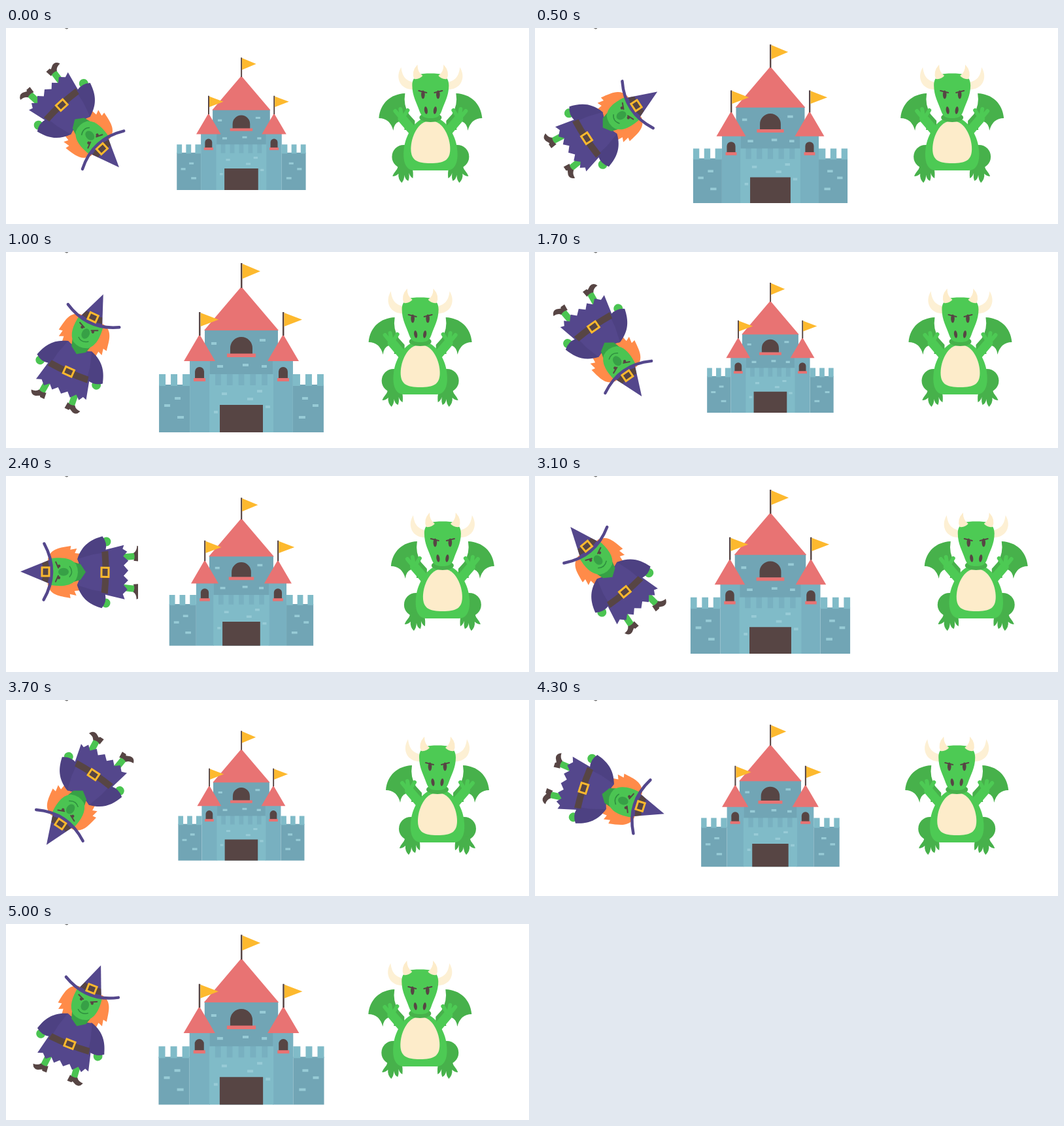
Animation of 800 by 300 pixels, one loop 5.1 s. Source, as an HTML page without scripts:

```html
<!DOCTYPE html>
<html lang="en">
<head>
<meta charset="utf-8">
<title>Witch, castle and dragon</title>
<style>
  @property --phase { syntax: "<number>"; inherits: true; initial-value: 0; }

  html, body { margin: 0; width: 100%; height: 100%; overflow: hidden; background: #fff; }

  /* --swing bounces between 0 and 2, --shrink between 0 and 1 */
  svg {
    display: block; width: 800px; height: 300px;
    --abs: max(var(--phase), -1 * var(--phase));
    --swing: max(min(var(--abs), 4 - var(--abs)), var(--abs) - 4);
    --shrink: min(var(--swing), 2 - var(--swing));
    animation: run 5.1s infinite;
  }
  @keyframes run {
    0%     { --phase: -.763; animation-timing-function: steps(10); }
    19.6%  { --phase: .134;  animation-timing-function: steps(7); }
    33.33% { --phase: .807;  animation-timing-function: steps(7); }
    47.05% { --phase: 1.503; animation-timing-function: steps(7); }
    60.78% { --phase: 2.222; animation-timing-function: steps(12); }
    84.31% { --phase: 3.402; animation-timing-function: steps(7); }
    98.03% { --phase: 4.12;  animation-timing-function: steps(1); }
    100%   { --phase: 4.22; }
  }
  #witch  { transform: translate(112px, 147px) rotate(calc(var(--swing) * 180deg)); }
  #castle { transform: translate(359.7px, 146.6px) scale(calc(1.0454 - .344 * var(--shrink))); }
  #dragon { transform: translateX(calc(630.3px + 25px * var(--swing))); }

  .purple { fill: #54478c; } .sleeve { fill: #4d4182; } .hair { fill: #ff8b49; }
  .skin { fill: #4bc452; } .shade { fill: #37a046; }
  .dark { fill: #574544; } .gold { fill: #fdb92e; }
  .red { fill: #e87373; } .keep { fill: #71a5b5; } .tower { fill: #78b0c0; }
  .front { fill: #80bbc8; } .brick { fill: #97cbd6; }
  .leaf { fill: #4dca54; } .wing { fill: #47b14b; } .cream { fill: #fdecca; } .horn { fill: #fdf0d4; }
  .line { fill: none; stroke: #574544; stroke-width: 2; stroke-linecap: round; }
  .limb { fill: none; stroke: #4dca54; stroke-linecap: round; stroke-linejoin: round; }
  .buckle { fill: #574544; stroke: #fdb92e; stroke-width: 3; }
</style>
</head>
<body>
<svg viewBox="0 0 800 300">
  <clipPath id="stage"><path d="M0 0H202V300H0z"/></clipPath>
  <path d="M90 0h2v1h2v-1h1" fill="none" stroke="#555"/>

  <g clip-path="url(#stage)"><g id="witch">
    <g id="leg">
      <path class="skin" d="M18 64H28L30 85H20z"/>
      <path class="dark" d="M18 83Q24 86 30 83Q33 88 41 88Q38 96 31 94L25 91L24 93H17z"/>
      <circle class="skin" cx="47" cy="41" r="7"/>
    </g>
    <use href="#leg" transform="scale(-1 1)"/>
    <path class="hair" d="M-20-48C-36-44-37-30-40-13L-34-14L-36-4L-29-7L-28 2L-20 0H20L28 2L29-7L36-4L34-14L40-13C37-30 36-44 20-48z"/>
    <path class="purple" d="M-32 30H32L42 68L36 66L32 73L25 67L18 75L11 68L3 75L-5 68L-12 75L-19 68L-26 74L-33 67L-41 70z"/>
    <path class="sleeve" d="M-20-3Q0 6 20-3C42 4 50 18 55 35Q45 43 33 40H-33Q-45 43-55 35C-50 18-42 4-20-3z"/>
    <path class="purple" d="M-20-3Q0 6 20-3L27 20L30 38H-30L-27 20z"/>
    <path class="dark" d="M-31 34Q0 37 31 34L33 44Q0 47-33 44z"/>
    <rect class="buckle" x="-7" y="34" width="14" height="11"/>
    <path class="shade" d="M-15-8H15L12 2L0 10L-12 2z"/>
    <path class="skin" d="M-20-46H20C23-28 22-13 12-5Q0 1-12-5C-22-13-23-28-20-46z"/>
    <ellipse class="shade" cx="0" cy="-24" rx="6" ry="8"/>
    <path class="line" d="M-15-36L-6-32M15-36L6-32"/>
    <circle class="dark" cx="-9" cy="-31" r="2.2"/>
    <circle class="dark" cx="9" cy="-31" r="2.2"/>
    <path d="M-8-15Q0-8 9-15" fill="none" stroke="#2f8f40" stroke-width="1.5"/>
    <path class="purple" d="M0-90L18-46Q0-38-18-46z"/>
    <path class="dark" d="M-13-57Q0-53 13-57L17-48Q0-43-17-48z"/>
    <path d="M-43-54Q0-30 43-54" fill="none" stroke="#54478c" stroke-width="4.500" stroke-linecap="round"/>
    <rect class="buckle" x="-6.500" y="-57" width="13" height="11"/>
  </g></g>

  <g id="castle"><g transform="translate(-359.7 -146.6)">
    <path class="keep" d="M304 119H416V190H304z"/>
    <path class="tower" d="M304 187H416V210H304z"/>
    <g id="side">
      <path class="keep" d="M234 203H281V276H234z"/>
      <path class="front" d="M234 187h10v18h-10zM252 187h10v18h-10zM270 187h11v18h-11z"/>
      <path class="tower" d="M281 166H312V276H281z"/>
      <path class="red" d="M296 126L272 167H320z"/>
      <path class="dark" d="M289 194V183a7 7 0 0 1 14 0v11z"/>
      <path class="red" d="M287 193h18v5h-18z"/>
      <path class="brick" d="M242 233h9v4h-9zM258 222h9v4h-9zM262 251h10v4h-10z"/>
    </g>
    <use href="#side" transform="translate(720) scale(-1 1)"/>
    <path class="front" d="M311 276V187h9v17h8.800v-17h9v17h8.800v-17h9v17h8.800v-17h9v17h8.800v-17h9v17h8.800v-17h9v89z"/>
    <path class="brick" d="M314 138h8v4h-8zM388 133h9v4h-9zM323 173h9v4h-9zM362 171h9v4h-9zM391 173h8v4h-8zM330 215h8v4h-8zM369 223h9v4h-9zM384 211h8v4h-8zM318 243h6v4h-6zM397 235h7v4h-7z"/>
    <path class="red" d="M360 53L303 120H417z"/>
    <path class="dark" d="M343 156V147a17 17 0 0 1 34 0v9zM327 234H393V276H327z"/>
    <path class="red" d="M338 155.500h44v5.500h-44z"/>
    <path class="dark" d="M359 17h2.500v38h-2.500zM295 92h2.500v36h-2.500zM423 92h2.500v36h-2.500z"/>
    <path class="gold" d="M361.500 18L389 29.500L361.500 41zM297.500 93L325 103.500L297.500 114zM425.500 93L453 103.500L425.500 114z"/>
  </g></g>

  <g id="dragon">
    <g id="half">
      <path class="wing" d="M-79 138C-77 115-61 101-39 100Q-42 118-33 132L-24 142V156H-40Q-38 142-48 143Q-56 146-57 157Q-62 138-79 138z"/>
      <path class="limb" stroke-width="14" d="M-25 160L-43 139"/>
      <path class="limb" stroke-width="6" d="M-45 138L-54 127M-44 137L-46 124M-42 137L-35 126"/>
      <path class="horn" d="M-27 94C-43 95-56 79-45 60C-43 75-38 80-27 83z"/>
      <ellipse class="wing" cx="-41" cy="197" rx="18" ry="18"/>
      <path class="wing" d="M-53 207C-45 214-56 219-58 227Q-53 227-49 223Q-50 231-44 237Q-40 232-40 225Q-39 232-34 234Q-32 229-33 222Q-31 228-27 230Q-26 222-28 212z"/>
    </g>
    <use href="#half" transform="scale(-1 1)"/>
    <path class="leaf" d="M0 136C22 136 36 160 40 180C44 204 38 218 25 218H-25C-38 218-44 204-40 180C-36 160-22 136 0 136z"/>
    <path class="cream" d="M0 142C20 142 30 168 30 185C30 203 20 207 0 207S-30 203-30 185C-30 168-20 142 0 142z"/>
    <ellipse class="wing" cx="0" cy="137" rx="17" ry="7"/>
    <path class="leaf" d="M0 69.500C15 69.500 28 71 28 88C28 104 21 115 17 127C14 136 9 138 0 138S-14 136-17 127C-21 115-28 104-28 88C-28 71-15 69.500 0 69.500z"/>
    <g id="face">
      <path class="cream" d="M-20 56Q-30 67-25 78Q-17 79-12 73Q-20 68-20 56z"/>
      <ellipse class="dark" cx="-11.500" cy="102" rx="2.800" ry="6.500"/>
      <path class="line" d="M-18 96L-6 99"/>
      <ellipse class="dark" cx="-7" cy="126" rx="2.500" ry="5.800" transform="rotate(-8 -7 126)"/>
    </g>
    <use href="#face" transform="scale(-1 1)"/>
  </g>
</svg>
</body>
</html>
```
